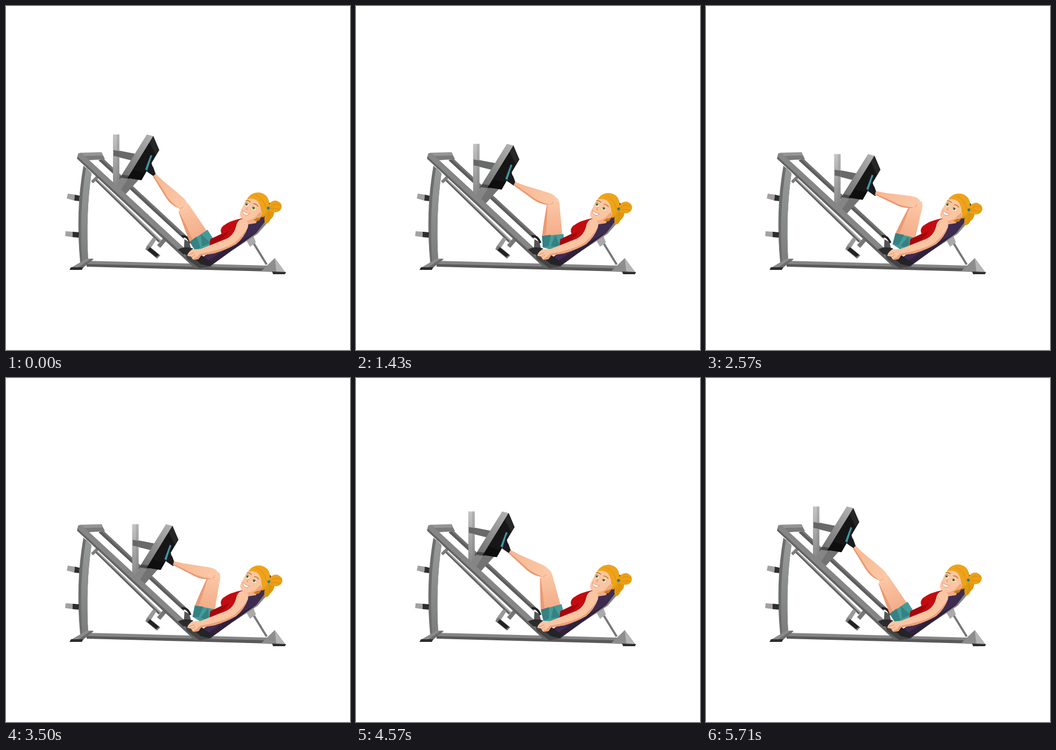
These frames come from a looping animation (640 px wide and 640 px high, 5780 ms). An HTML page:

```html
<!DOCTYPE html>
<html lang="en">
<head>
<meta charset="utf-8">
<title>Leg press</title>
<style>
html, body { margin: 0; width: 100%; height: 100%; overflow: hidden; background: #fff; }
svg { display: block; width: 100vw; height: 100vh; }
</style>
</head>
<body>
<svg viewBox="0 0 640 640">
  <defs>
    <linearGradient id="steel" x2="0" y2="1"><stop stop-color="#c4c4c4"/><stop offset="1" stop-color="#858585"/></linearGradient>
    <linearGradient id="plate" x1="1" x2="0" y2="1"><stop stop-color="#b4b4b4"/><stop offset="1" stop-color="#6c6c6c"/></linearGradient>
    <linearGradient id="post" x2="0" y2="1"><stop stop-color="#969b99"/><stop offset="1" stop-color="#7c7e7d"/></linearGradient>
    <linearGradient id="skin" x2="1"><stop stop-color="#f6b892"/><stop offset="1" stop-color="#fcc9a8"/></linearGradient>
    <linearGradient id="thighSkin" x2="1"><stop stop-color="#fccaa9"/><stop offset="1" stop-color="#f3ac88"/></linearGradient>
  </defs>

  <!-- far rail and lower rod -->
  <path fill="#5c5c5c" d="M172 287 181 284 335 427 330 433Z"/>
  <path fill="#757575" d="M177 285 181 284 335 427 333 430Z"/>
  <path fill="#606060" d="M163 322 168 320 289 436 284 440Z"/>
  <path fill="#a5a5a5" d="M166 321 168 320 289 436 287 438Z"/>
  <path fill="#7d7d7d" d="M158 326 168 316 172 320 162 330Z"/>
  <path fill="#777" d="M281 445 293 431 299 436 287 450Z"/>
  <path fill="#999" d="M260 449 274 430 280 434 267 454Z"/>
  <path fill="#777" d="M259 452 265 446 287 464 281 470Z"/>
  <path fill="#222" d="M263 454 268 449 285 463 279 467Z"/>

  <g id="carriage">
    <path fill="#686a6a" d="M200 267 241 275 236 288 200 279Z"/>
    <path fill="url(#steel)" d="M199 239H211V327L206 341 199 334Z"/>
    <path fill="#777" opacity=".25" d="M206 239H211V327L206 341Z"/>
    <path fill="#666" d="M200 268 211 270V281L200 279Z"/>
    <path fill="#737373" d="M214 318 247 323 219 354 205 340Z"/>
    <path fill="#858585" d="M214 318 228 320 211 346 205 340Z"/>
    <path fill="url(#plate)" d="M262 239 274 242 229 321 213 318Z"/>
    <path fill="#494a4b" d="M216 314 232 316 229 322 212 319Z"/>
    <path fill="#161616" d="M274 242 285 268 252 324 226 320Z"/>
    <path fill="#272727" d="M274 242 285 268 279 278 267 254Z"/>
    <path fill="#0e0e0e" d="M238 305 259 311 252 324 226 320Z"/>
    <path fill="#3f98a6" d="M269 277 272 279 265 307 259 304Z"/>
    <path fill="#1a1b20" d="M271 280Q269 294 274 300L279 314 275 317 262 308Z"/>
  </g>

  <!-- frame -->
  <path fill="#959595" d="M136 273 178 272 184 285 149 287Z"/>
  <path fill="#7a7a7a" d="M146 279 180 278 184 285 149 287Z"/>
  <path fill="#6c6e6d" d="M144 297Q129 382 138 477H153Q148 385 159 311Z"/>
  <path fill="url(#post)" d="M149 300Q135 385 142 477H153Q148 385 159 311Z"/>
  <path fill="#a2a2a2" d="M115 349 128 351 127 362 113 358Z"/>
  <path fill="#2d2d2d" d="M128 351 137 353 136 363 127 362Z"/>
  <path fill="#a2a2a2" d="M111 419 124 420 124 430 110 428Z"/>
  <path fill="#2d2d2d" d="M124 420 136 421 135 431 124 430Z"/>
  <path fill="#595959" d="M150 475 488 484V494L150 485Z"/>
  <path fill="#858585" d="M150 474 488 483V488L150 480Z"/>
  <path fill="#8b8b8b" d="M150 470H163L142 488H119Z"/>
  <path fill="#6c6c6c" d="M157 471H163L142 488 133 487Z"/>
  <path fill="#2d2d2d" d="M121 486H144L141 491H118Z"/>
  <path fill="#8d8d8d" d="M500 469 474 494 520 496Z"/>
  <path fill="#b5b5b5" d="M500 469 503 495 520 496Z"/>
  <path fill="#2d2d2d" d="M495 494 521 495 519 499H497Z"/>
  <path fill="#636363" d="M134 276 142 276 372 488 350 487 132 284Z"/>
  <path fill="#868686" d="M134 274 142 275 352 469 344 475 134 281Z"/>
  <path fill="#444" d="M329 451 348 457 384 484 360 488 337 471Z"/>

  <!-- seat -->
  <path fill="none" stroke="#222" stroke-width="4" d="M327 428Q338 427 343 441"/>
  <path fill="#555" d="M332 434 341 439 345 454 331 452Z"/>
  <path fill="none" stroke="#777" stroke-width="4" d="M461 442 485 481"/>
  <path fill="#aaa" d="M447 436 460 427 465 440 454 448Z"/>
  <path fill="#858585" d="M490 382 497 391 468 424 422 454Z"/>
  <path fill="#3e2b50" d="M478 375 494 385 466 422 420 455 384 481 365 468 430 420Z"/>
  <path fill="#302039" d="M466 422 420 455 384 481 375 475 415 448Z"/>
  <path fill="#222" d="M482 363 492 367 495 373 494 384 486 390Z"/>
  <path fill="#242327" d="M344 464 363 463 386 480 378 484 362 480Z"/>

  <!-- leg -->
  <g id="thigh">
    <path fill="url(#thighSkin)" d="M-8-8Q-2-13 12-13 38-15 65-17L64 21Q35 17 11 12 -4 9-8-8Z"/>
    <path fill="#ea9a74" d="M4 10Q34 11 64 14V21Q35 17 4 11Z"/>
  </g>
  <g id="shin">
    <path fill="url(#skin)" d="M-1-3Q18-4 38-8L64-12Q82-14 85-4 86 6 74 8 60 14 45 12 22 8-1 4Z"/>
    <path fill="#ea9a74" d="M-1 2Q25 5 45 9 60 10 74 7V8Q60 14 45 12 22 8-1 4Z"/>
    <path fill="none" stroke="#e9966f" d="M76 6Q80 3 79-1"/>
  </g>
  <g id="shorts">
    <path fill="#449b98" d="M60-19 63 21 84 20 92-6 80-20Z"/>
    <path fill="#358183" d="M61 5 63 21 84 20 82 9Z"/>
    <path fill="#358183" d="M61-4 84-12 82 5Z"/>
  </g>

  <!-- torso -->
  <path fill="#f3ad86" d="M456 390 471 390 465 404 446 407 436 400Z"/>
  <path fill="#c40b10" d="M439 395 446 400 438 423 411 440 379 446 380 434 401 424Q397 415 404 409 417 399 439 395Z"/>
  <path fill="#a3060d" d="M401 424Q408 424 414 418 411 432 379 446L380 434Z"/>
  <path fill="#2b2b2d" d="M320 453Q332 446 348 451L343 463 330 462Z"/>
  <path fill="#fac5a2" d="M441 396Q453 398 450 412 443 431 428 443 411 453 388 460L363 464 358 471 348 472 344 466 338 465Q336 461 346 453L362 452 408 434Q425 427 429 406 433 396 441 396Z"/>
  <path fill="#ee9f77" d="M450 411Q443 431 428 443 411 453 388 460L363 464 358 471 348 472 350 469 355 467 361 461Q407 453 426 440 442 426 450 411Z"/>
  <path fill="none" stroke="#e08d66" d="M340 463 350 459M345 467 352 463"/>

  <g id="head">
    <path fill="#c47d0c" d="M459 396Q470 395 480 386L471 399Q463 402 459 396Z"/>
    <path fill="#e0970f" d="M483 378Q490 375 499 384 498 392 492 397 488 406 482 405 480 397 481 392Z"/>
    <path fill="#e59b12" d="M450 359Q456 347 470 347 489 349 490 370 488 388 478 393 466 390 465 375Z"/>
    <path fill="#fbc5a1" d="M447 361Q458 353 468 362 474 370 475 382 479 386 474 392 470 395 467 394 460 400 448 399 437 397 435 388 436 381 441 373 443 366 447 361Z"/>
    <path fill="#f0a67f" d="M473 383Q479 385 474 392 470 395 467 394 460 400 448 399 463 397 468 388Z"/>
    <path fill="#efa319" d="M448 360Q455 347 470 347 490 351 489 371 485 386 478 389 476 374 469 364 460 355 448 360Z"/>
    <path fill="#eca016" d="M488 374Q491 361 503 362 516 367 512 377 506 388 490 381Z"/>
    <path fill="none" stroke="#cf860b" stroke-width=".8" d="M464 352Q479 357 484 376M491 375Q500 364 510 371M492 378Q501 375 510 378M489 383Q493 390 485 400"/>
    <circle cx="488" cy="376" r="2.7" fill="#277e85"/>
    <path fill="none" stroke="#b9741a" stroke-width="1.5" d="M446 362Q451 361 455 365M460 368Q466 368 469 373"/>
    <g fill="#fff"><ellipse cx="448" cy="369" rx="3.2" ry="4"/><ellipse cx="461" cy="376" rx="4" ry="3.5"/></g>
    <g fill="#728b36"><circle cx="447.500" cy="369" r="2.5"/><circle cx="460.500" cy="376" r="2.5"/></g>
    <g fill="#252a16"><circle cx="447.500" cy="369" r="1"/><circle cx="460.500" cy="376" r="1"/></g>
    <path fill="none" stroke="#7a5530" stroke-width=".8" d="M445 367Q448 363 451 368M457 375Q461 371 465 377"/>
    <path fill="none" stroke="#df8960" d="M450 374 447 378 450 379"/>
    <path fill="#fff" stroke="#c9604e" stroke-width=".6" d="M440 380Q445 386 453 386 449 391 443 388 440 386 440 380Z"/>
  </g>
</svg>
<script>
const LOOP = 5780, START = 80, PEAK = 2930, REST = 5370;
const TRAVEL = 41, SHIN = 78, THIGH = 75.4;
const part = id => document.getElementById(id);
const [carriage, thigh, shin, shorts, head] =
  ['carriage', 'thigh', 'shin', 'shorts', 'head'].map(part);

const ease = u => (1 - Math.cos(Math.PI * Math.min(1, Math.max(0, u)))) / 2;
const bend = t => t < PEAK ? ease((t - START) / (PEAK - START)) : ease((REST - t) / (REST - PEAK));

function place(el, from, to) {
  const angle = Math.atan2(to.y - from.y, to.x - from.x) * 180 / Math.PI;
  el.setAttribute('transform', `translate(${from.x} ${from.y}) rotate(${angle})`);
}

// Two-bone joint: the knee bends up and towards the head.
function findKnee(ankle, hip) {
  const dx = hip.x - ankle.x, dy = hip.y - ankle.y, d = Math.hypot(dx, dy);
  const along = (SHIN ** 2 + d ** 2 - THIGH ** 2) / (2 * d);
  const out = Math.sqrt(Math.max(0, SHIN ** 2 - along ** 2));
  return { x: ankle.x + (dx * along + dy * out) / d, y: ankle.y + (dy * along - dx * out) / d };
}

function draw() {
  const p = bend(performance.now() % LOOP), slide = TRAVEL * p;
  const ankle = { x: 277 + slide, y: 315 + slide * .82 };
  const hip = { x: 366 + 3 * p, y: 439 + 2 * p };
  const knee = findKnee(ankle, hip);
  carriage.setAttribute('transform', `translate(${slide} ${slide * .925})`);
  place(shin, ankle, knee);
  place(thigh, knee, hip);
  place(shorts, knee, hip);
  head.setAttribute('transform', `rotate(${4 * p} 440 395)`);
  requestAnimationFrame(draw);
}
draw();
</script>
</body>
</html>
```
